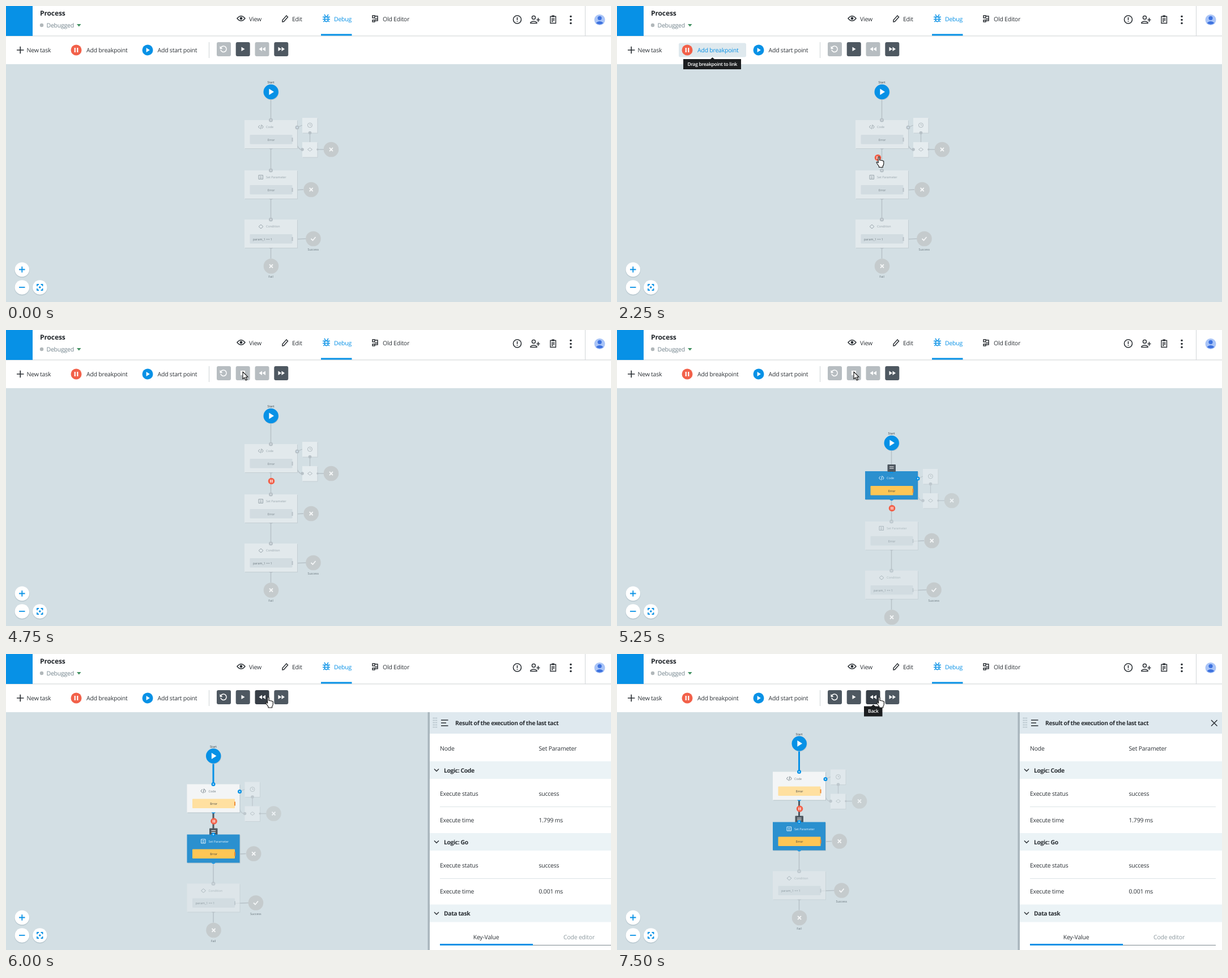
These frames come from a looping animation (1068x524 px, 8 s). An HTML page:

```html
<!DOCTYPE html>
<html lang="en">
<head>
<meta charset="utf-8">
<title>Process debug</title>
<style>
html, body { margin: 0; width: 100%; height: 100%; overflow: hidden; background: #fff; }
svg { display: block; font: 10.5px "Open Sans", "Noto Sans", sans-serif; letter-spacing: -.22px; text-rendering: geometricPrecision; }
.b { font-weight: 700; letter-spacing: -.45px; }
.tip { font-size: 8.5px; font-weight: 600; letter-spacing: -.3px; }
.node { font-size: 5.4px; letter-spacing: 0; }
</style>
</head>
<body>
<svg id="stage" width="1068" height="524" viewBox="0 0 1068 524"></svg>
<script>
const LOOP = 8000;
const BLUE = '#0791e6', DARK = '#4e5861', INK = '#2c3136', GREY = '#b7c1c7', RED = '#f2614a', BG = '#d3dfe4';

// time, cursor kind, x, y
const CURSOR = [
  [0, '', 0, 0], [750, 'arrow', 216, 82], [1000, 'arrow', 177, 78], [1250, 'arrow', 172.5, 74],
  [1750, 'drag', 371, 203], [2000, 'drag', 449.5, 247], [2250, 'drag', 457.5, 266.5], [2500, 'drag', 467, 266.5],
  [2750, 'hand', 468, 266.5], [3750, 'arrow', 470, 205], [4000, 'arrow', 428, 89], [4250, 'hand', 413, 72],
  [4750, 'arrow', 418, 74], [5500, 'arrow', 436, 80], [5750, 'hand', 458, 76]
];
// time, diagram offset x, y, panel left edge
const VIEW = [
  [0, 0, 0, 1080], [5250, 17, 48, 1080], [5500, 34.5, 95.5, 1080],
  [5750, 34.5, 95.5, 1080], [6000, -101.5, 28.5, 745], [6250, -146, 6.5, 708]
];

const at = (list, t) => list.filter(k => k[0] <= t).pop();
const rect = (x, y, w, h, fill, r = 0) => `<rect x="${x}" y="${y}" width="${w}" height="${h}" rx="${r}" fill="${fill}"/>`;
const disc = (x, y, r, fill) => `<circle cx="${x}" cy="${y}" r="${r}" fill="${fill}"/>`;
const line = (d, color, w = 1.5) => `<path d="${d}" fill="none" stroke="${color}" stroke-width="${w}"/>`;
const fill = (d, color) => `<path d="${d}" fill="${color}"/>`;
const text = (x, y, s, color = INK, cls = '', anchor = 'start') =>
  `<text x="${x}" y="${y}" fill="${color}" class="${cls}" text-anchor="${anchor}">${s}</text>`;
const move = (x, y, body, extra = '') => `<g transform="translate(${x} ${y})" ${extra}>${body}</g>`;

const pause = (x, y, r) => disc(x, y, r, RED) +
  line(`M${x - r * .24} ${y - r * .42}v${r * .84}M${x + r * .24} ${y - r * .42}v${r * .84}`, '#fff', r * .23);
const start = (x, y, r) => disc(x, y, r, BLUE) +
  fill(`M${x - r * .25} ${y - r * .42}v${r * .84}l${r * .65} ${-r * .42}z`, '#fff');

function header() {
  const eye = line('M408 22q7-8.5 14 0q-7 8.500-14 0z', INK) + disc(415, 22, 2.4, INK);
  const pencil = line('M488 28v-3l7-8 2.500 2.500-7 8z', INK);
  const bug = line('M562.500 20.500q3-3.500 6 0v5q-3 4.500-6 0zM559 19.500h13M559 23.500h13M560 28l3-2M571 28l-3-2M562 15l2 3M569 15l-2 3', BLUE, 1.4);
  const flow = line('M647 17h4v4h-4zM647 25h4v3h-4zM651 18h5v5h-5M656 23v3h-5', INK, 1.5);
  const alert = line('M895.500 24a7 7 0 1 0 14 0a7 7 0 1 0-14 0M902.500 20v5M902.500 26.500v1.500', INK, 1.6);
  const person = line('M928.500 20.500a3 3 0 1 0 6 0a3 3 0 1 0-6 0M926 30.500v-1.500q5.500-4 11 0v1.500zM939.500 21v7M936.500 24.500h6', INK, 1.5);
  const clip = line('M961 18.500h9.500v12h-9.500zM963 22.500h5.500M963 25h5.500M963 27.500h3', INK, 1.4) + rect(963.5, 16.5, 4.5, 3, INK);
  return rect(0, 0, 1068, 103, '#fff') + rect(0, 52.5, 1068, 1, '#cdd1d3') + rect(0, 0, 47, 53, BLUE) +
    `<text x="60" y="17" fill="#20252a" font-size="12" font-weight="700" letter-spacing="-.1">Process</text>` +
    disc(63, 34, 3.2, '#b1b7ba') + text(71.5, 38, 'Debugged', '#71828b') + fill('M125 32h7.500l-3.750 4.500z', '#3f8f5f') +
    eye + text(429, 27, 'View') + pencil + text(505, 27, 'Edit') + bug + text(579, 27, 'Debug', BLUE) +
    flow + text(665, 27, 'Old Editor') + rect(556, 49.5, 54.5, 3, BLUE) + alert + person + clip +
    [18.5, 24.5, 30.5].map(y => disc(997, y, 1.8, INK)).join('') + rect(1022, 0, 1, 53, '#d2d6d8') +
    disc(1048, 24.5, 9.5, '#a9c4f7') + disc(1048, 21.5, 3.6, '#3d72df') + fill('M1041.500 30q6.500-6 13 0q-6.500 5-13 0z', '#3d72df');
}

function toolbar(t) {
  const hover = t >= 750 && t < 3250;
  const running = t >= 4750 && t < 5750;
  const ready = t >= 5500;
  const off = '#b7bdc1', hot = '#373e46';
  const key = (x, color, icon) => rect(x, 64, 25, 25, color, 3) + icon;
  const play = running ? rect(414, 72, 8, 8, '#fff') : fill('M415.500 72.500v7.500l6-3.750z', '#fff');
  const playColor = running ? off : t >= 4250 && t < 4750 ? hot : DARK;
  return (hover ? rect(109, 65.5, 119, 25, '#dfe9ee', 3) : '') +
    line('M19 78h12.500M25.250 71.750v12.500', INK, 1.7) + text(36.5, 82, 'New task') +
    pause(124, 78, 9.5) + text(142, 82, 'Add breakpoint', hover ? BLUE : INK) +
    start(250, 78, 9.5) + text(267.5, 82, 'Add start point') + rect(358, 64, 1, 28, '#ced3d5') +
    key(372, ready ? DARK : off, line('M379.500 73.500a5.200 5.200 0 1 1-.6 4', '#fff', 1.5) + fill('M377.500 71v5h5z', '#fff')) +
    key(405.7, playColor, play) +
    key(439.5, t >= 5750 ? hot : ready ? DARK : off, fill('M452 72.500v7.500l-5.500-3.750zM458 72.500v7.500l-5.500-3.750z', '#fff')) +
    key(473.3, DARK, fill('M480.500 72.500v7.500l5.500-3.750zM486.500 72.500v7.500l5.500-3.750z', '#fff'));
}

function tips(t) {
  let s = '';
  if (t >= 1000 && t < 3500) {
    s += `<g opacity="${t < 3250 ? 1 : .03}">` + fill('M164.500 94.500l4-3.500 4 3.500z', '#1c1e20') +
      rect(117, 94, 102, 18, '#1c1e20') + text(168.3, 106, 'Drag breakpoint to link', '#fff', 'tip', 'middle') + '</g>';
  }
  if (t >= 6750) {
    s += fill('M448.500 93l4-3.500 4 3.500z', '#1c1e20') + rect(436, 92.5, 32.500, 18, '#1c1e20') +
      text(452.3, 104, 'Back', '#fff', 'tip', 'middle');
  }
  return s;
}

// state: idle, done or active
const look = {
  idle: { box: '#e2e9ec', bar: '#d2dce1', ink: '#98a4ab', port: GREY, err: '#727d84', tick: GREY },
  done: { box: '#f3f5f6', bar: '#ffe0a0', ink: '#6f7c84', port: BLUE, err: '#34383b', tick: '#ef8b35' },
  active: { box: '#2b90cf', bar: '#fdc655', ink: '#e4f2fb', port: BLUE, err: '#34383b', tick: '#ef8b35' }
};

function card(y, title, icon, label, state, dim) {
  const c = look[state];
  const shade = rect(422, y + 1, 93, 50, state === 'idle' ? '#c4ced3' : '#b5c3ca');
  const words = label === 'Error'
    ? text(468, y + 36.5, label, c.err, 'node', 'middle')
    : text(436, y + 36.5, label, '#6b777e', 'node');
  return `<g opacity="${state === 'idle' && dim ? .68 : 1}">` + shade + rect(421, y, 93, 50, c.box) +
    line(icon, c.ink, 1) + text(459, y + 14, title, c.ink, 'node') +
    rect(430.5, y + 26, 75, 16.500, c.bar, 1) + words + rect(504.5, y + 31, 2, 7, c.tick) +
    fill(`M464 ${y + 50}h7.500q-3.750 4-7.500 0z`, c.port) + disc(467.5, y, 3.5, c.port) +
    disc(467.5, y, 1.2, state === 'idle' ? '#d9e0e4' : '#bfe3fb') + '</g>';
}

function endNode(x, y, mark) {
  const d = mark === 'x' ? `M${x - 3} ${y - 3}l6 6m0-6l-6 6` : `M${x - 4} ${y}l3 3 5-6`;
  return disc(x, y, 13.3, '#c5cbcd') + line(d, '#f4f6f7', 1.8);
}

function diagram(t) {
  const run = t >= 5250;
  const code = !run ? 'idle' : t < 5750 ? 'active' : 'done';
  const set = t >= 5750 ? 'active' : 'idle';
  const first = t >= 6000 ? [BLUE, 3] : t >= 5750 ? [DARK, 3] : [GREY, 1.5];
  const second = t >= 6000 ? [DARK, 3] : t >= 2500 && t < 3500 ? ['#6fa2c2', 2] : [GREY, 1.5];
  const small = (y, icon) => rect(524, y + 1, 26.5, 26.5, '#c6d0d5') + rect(523, y, 26.5, 26.5, '#e5ecef') + line(icon, '#b1bbc0', 1);
  const side = line('M514 215l9-4M536.500 224v17M506 237q5 0 8 9t9 8M550 254h11', GREY, 1.3) +
    small(198, 'M532.500 211a4 4 0 1 0 8 0a4 4 0 1 0-8 0M536.500 209v2h2') +
    small(241, 'M532.500 254l4-3 4 3-4 3z') + disc(536.5, 224.5, 2.8, GREY) + disc(523, 254, 2.8, GREY) +
    disc(550, 254, 1.8, GREY) + endNode(574, 254, 'x');
  const menuY = code === 'active' ? 197 : 287;
  return line('M467.500 165v37', ...first) + line('M467.500 252v39', ...second) +
    line('M467.500 341v37M467.500 428v19M506 326l19-1M506 413l24-1', GREY, 1.5) +
    text(467.5, 137, 'Start', '#343b40', 'node', 'middle') + disc(468.3, 152.8, 13.3, '#b6c6cf') + start(467.7, 152, 13.2) +
    `<g opacity="${run ? .75 : 1}">${side}</g>` +
    card(202, 'Code', 'M448 211l-2.500 3 2.500 3M451 210l-1.500 8M452 211l2 3-2 3', 'Error', code, run) +
    disc(514, 215, 3.5, look[code].port) + disc(514, 215, 1.2, '#d5e6f0') +
    (run ? rect(460.5, menuY - 7, 14.5, 13, DARK, 1) + line(`M464 ${menuY - 3}h7.500m-7.500 3h7.500`, '#fff', 1) : '') +
    card(291, 'Set Parameter', 'M446 299.500h7.500v7h-7.500zM448 302h3.500M448 304.500h3.500', 'Error', set, run) +
    card(378, 'Condition', 'M446 390.500l4-3.500 4 3.500-4 3.500z', 'param_1 == 1', 'idle', run) +
    endNode(538.7, 325, 'x') + endNode(542.5, 412, 'v') + endNode(468, 460.5, 'x') +
    text(542.3, 433, 'Success', '#66737a', 'node', 'middle') + text(467.5, 481, 'Fail', '#66737a', 'node', 'middle') +
    (t >= 2750 ? pause(468.5, 267.5, 5.8) : '');
}

function zoom() {
  const knob = (x, y, d) => disc(x, y + 1, 13.4, '#bccbd2') + disc(x, y, 12.8, '#fff') + line(d, BLUE, 1.8);
  return knob(28.3, 466.5, 'M23 466.500h10.500M28.300 461.200v10.500') + knob(28.3, 498, 'M23 498h10.500') +
    knob(59.8, 498, 'M55 496v-3h3M61.500 493h3v3M64.500 500v3h-3M58 503h-3v-3') + disc(59.8, 498, 1.8, BLUE);
}

function panel() {
  const row = (y, key, value) => text(21, y, key) + text(195.500, y, value);
  const section = (y, name) => rect(3, y, 357, 31, '#ebf3f6') + line(`M11 ${y + 13.5}l4 4 4-4`, INK, 1.5) + text(28, y + 19.5, name, INK, 'b');
  const rule = y => rect(21, y, 328, 1, '#dce3e6');
  let dots = '';
  for (let i = 0; i < 15; i++) dots += disc(9.5 + i % 3 * 2.8, 113.5 + Math.floor(i / 3) * 4, .9, '#a7b5bd');
  return rect(0, 103, 400, 421, '#fff') + rect(-.5, 103, 3.5, 421, '#a9b6bd') + rect(3, 103, 397, 38, '#dfe9ef') + dots +
    line('M23 117h12.500M23 122h9M23 127h12.500', INK, 1.6) +
    text(48, 126, 'Result of the execution of the last tact', INK, 'b') + line('M341 117l10.500 10.500m0-10.500l-10.500 10.500', INK, 1.5) +
    row(171, 'Node', 'Set Parameter') +
    section(190, 'Logic: Code') + row(251, 'Execute status', 'success') + rule(270) + row(298, 'Execute time', '1.799 ms') +
    section(317, 'Logic: Go') + row(378, 'Execute status', 'success') + rule(397) + row(424, 'Execute time', '0.001 ms') +
    section(443.5, 'Data task') + text(102.5, 504.500, 'Key-Value', INK, '', 'middle') +
    text(266.500, 504.500, 'Code editor', '#8d999f', '', 'middle') + rect(185, 515, 164, 1, '#7e898f') + rect(21, 513, 164, 3, BLUE);
}

function pointer(kind, x, y) {
  const shapes = {
    arrow: 'M0 0v12.700l3-2.600 2.300 5 2.200-1-2.300-4.800h4z',
    hand: 'M3.700 10v-8.300q0-1.500 1.200-1.500t1.200 1.500v4.800q4.500-.2 7.200 1.700v4.500q0 2.500-1.600 4v2.300h-6.700v-1.800l-4.200-6q-.7-1.600.8-1.700q1 .1 2.100 1.700z'
  };
  if (!kind) return '';
  const d = shapes[kind === 'drag' ? 'hand' : kind];
  return (kind === 'drag' ? pause(x + 3, y + 2, 5.8) : '') +
    move(x, y, `<path d="${d}" fill="#fff" stroke="#111" stroke-width="1.1" stroke-linejoin="round"/>`);
}

function scene(t) {
  const [, dx, dy, px] = at(VIEW, t);
  const [, kind, cx, cy] = at(CURSOR, t);
  return rect(0, 103, 1068, 421, BG) + move(dx, dy, diagram(t)) + zoom() + move(px, 0, panel()) +
    header() + toolbar(t) + tips(t) + pointer(kind, cx, cy);
}

const stage = document.getElementById('stage');
let shown = -1;
function draw(now) {
  const step = Math.floor(now % LOOP / 250);
  if (step !== shown) {
    shown = step;
    stage.innerHTML = scene(step * 250);
  }
}
const origin = performance.now();
function tick() {
  draw(performance.now() - origin);
  requestAnimationFrame(tick);
}
tick();
</script>
</body>
</html>
```
